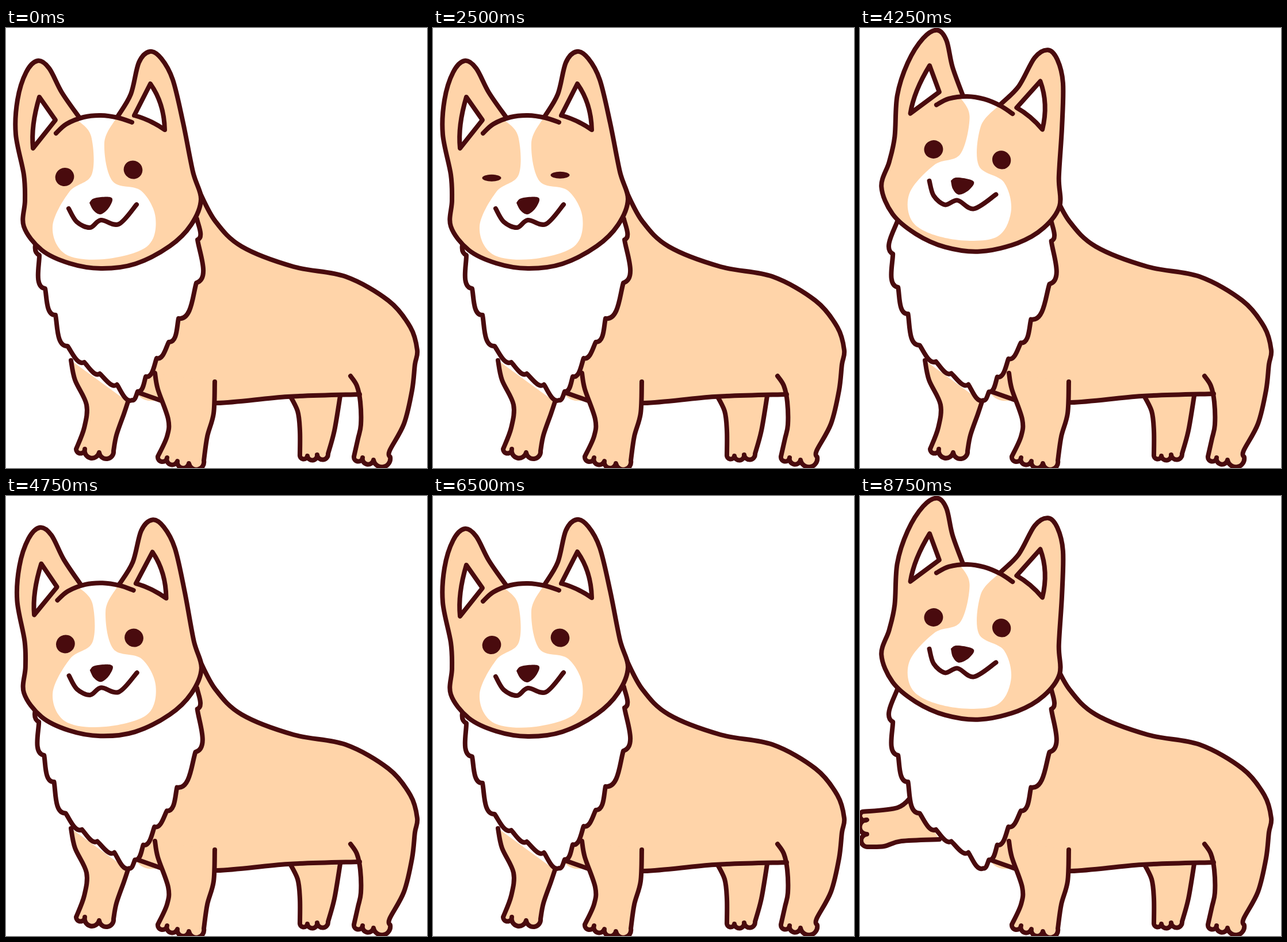
Recreate the animation shown at these times as an HTML page. Size 732 by 765 pixels, loop 9000 ms.

```html
<!DOCTYPE html>
<html lang="en">
<head>
<meta charset="utf-8">
<title>Dog</title>
<style>
  html, body { margin: 0; width: 100%; height: 100%; overflow: hidden; background: #fff; }
  svg { display: block; width: 100vw; height: 100vh; }
  path { stroke: #490b0e; stroke-width: 8; stroke-linecap: round; stroke-linejoin: round; fill: none; }
  .fur { fill: #ffd4a9; }
  .white { fill: #fff; }
  .plain { stroke: none; }
  .dark { fill: #490b0e; stroke: none; }
</style>
</head>
<body>
<svg id="stage" viewBox="0 0 732 765"></svg>
<script>
const STEP = 250, STEPS = 36;
const stage = document.getElementById('stage');

function add(parent, tag, attrs = {}) {
  const node = document.createElementNS('http://www.w3.org/2000/svg', tag);
  for (const key in attrs) node.setAttribute(key, attrs[key]);
  return parent.appendChild(node);
}

const toPoint = text => text.split(',').map(Number);

function smooth(pts) {
  let d = '';
  for (let i = 0; i < pts.length - 1; i++) {
    const p1 = pts[i], p2 = pts[i + 1], p0 = pts[i - 1] || p1, p3 = pts[i + 2] || p2;
    const a = p1.map((v, k) => v + (p2[k] - p0[k]) / 6);
    const b = p2.map((v, k) => v - (p3[k] - p1[k]) / 6);
    d += `C${a} ${b} ${p2}`;
  }
  return d;
}

// Smooth line through points; "|" makes a corner, "(" before a point a round toe.
function curve(text) {
  const [first, ...tokens] = text.trim().split(/\s+/);
  let run = [toPoint(first)], d = 'M' + first;
  for (const token of tokens) {
    const last = run[run.length - 1];
    if (token === '|') {
      d += smooth(run);
      run = [last];
    } else if (token[0] === '(') {
      const p = toPoint(token.slice(1));
      const r = Math.hypot(p[0] - last[0], p[1] - last[1]) / 2;
      d += smooth(run) + `A${r} ${r} 0 0 0 ${p}`;
      run = [p];
    } else run.push(toPoint(token));
  }
  return d + smooth(run);
}

// Tufts of fur between tips; each one is fullest at its lower end.
function tufts(text) {
  const tips = text.split(' ').map(toPoint);
  let d = 'M' + tips[0];
  for (let i = 1; i < tips.length; i++) {
    const [ax, ay] = tips[i - 1], [bx, by] = tips[i];
    const dx = bx - ax, dy = by - ay;
    const at = (along, out) => [ax + dx * along - dy * out, ay + dy * along + dx * out];
    const [c1, c2] = dy > 0 ? [at(.3, .05), at(.9, .32)] : [at(.1, .32), at(.7, .05)];
    d += `C${c1} ${c2} ${bx},${by}`;
  }
  return d;
}

const draw = (parent, look, points) => add(parent, 'path', { class: look, d: curve(points) });

// Far legs
const standingLeg = draw(stage, 'fur',
  '113,578 120,612 140,655 136,695 122,732 (137,732 (162,738 (187,735 192,708 205,671 212,650');
const raisedLeg = draw(stage, 'fur',
  '90,522 65,542 4,549 (12,563 (12,588 (14,610 42,609 72,600 138,597');
draw(stage, 'fur', '492,636 507,666 511,700 511,742 (524,744 (541,742 (560,740 571,700 581,640');

// Torso and near legs
const back = `599,605 610,622 616,650 617,690 612,714 605,745 (620,747 (639,751 (668,746 667,735 692,688
  706,630 711,585 715,560 703,520 665,474 590,432 500,415 410,380 364,336 336,284`;
const belly = '225,632 270,648 | 367,652 490,641 615,637';
draw(stage, 'fur plain', `${back} | 180,500 | ${belly}`);
const bellyLine = draw(stage, '', belly);
draw(stage, '', back);
draw(stage, 'fur', `259,600 264,628 282,680 280,710 264,745 (280,747 (298,753 (318,757 (344,752
  350,710 361,670 363,615`);

const chest = add(stage, 'path', {
  class: 'white',
  d: tufts('66,335 58,395 68,453 86,499 107,553 136,581 163,601 193,620 219,647 ' +
    '229,632 243,606 262,574 283,546 300,505 331,443 333,368 332,332')
});

// Head
const head = add(stage, 'g');
draw(head, 'fur', `127,155 97,112 75,70 55,57 35,77 20,125 17,185 31,255 33,300 31,345 62,386 110,409
  165,418 225,410 285,379 322,342 339,298 325,250 308,165 290,90 270,53 250,41 231,60 217,115 194,154`);
draw(head, 'white plain', `124,160 148,188 149,255 110,285 81,345 103,393 170,402 245,380 260,330
  235,283 185,266 171,200 190,159 | 157,153`);
draw(head, '', '87,183 105,167 135,155 165,152 195,156 219,164');
add(head, 'path', { class: 'white', d: 'M58 120L86 160L47 209Q43 170 58 120Z' });
add(head, 'path', { class: 'white', d: 'M251 97Q275 131 276 177Q250 159 223 152Z' });
draw(head, 'dark', '145,304 151,297 165,294 181,294 185,300 177,315 164,324 152,317 145,304');
draw(head, '', '109,314 123,337 146,347 165,334 196,341 227,307');

const eyes = [
  { x: 102, y: 259, drop: 3, tilt: -30 },
  { x: 221, y: 246.5, drop: 15, tilt: 30 }
];
for (const eye of eyes) eye.node = add(head, 'ellipse', { class: 'dark', cx: eye.x, rx: 16.5 });

// Two blinks in a row: half shut, shut, half open, open
const openness = i => i >= 4 && i <= 12 ? [1, .67, .38, .67][i % 4] : 1;

function pose(i) {
  const odd = i % 2 === 1;
  const pawUp = i > 30;
  const tilted = pawUp || (i >= 15 && i < 24 && Math.floor(i / 3) % 2 === 1);

  standingLeg.style.display = pawUp ? 'none' : '';
  raisedLeg.style.display = pawUp ? '' : 'none';
  bellyLine.setAttribute('transform', `translate(0 ${odd && !pawUp ? -1 : 0})`);
  chest.setAttribute('transform', `rotate(${odd ? 0.95 : 0} 200 345)`);
  head.setAttribute('transform', tilted
    ? `translate(${odd ? 95.7 : 94} -65.5) rotate(14.85)`
    : odd ? 'translate(5 -3) rotate(.8)' : '');

  const open = openness(i);
  for (const { x, y, drop, tilt, node } of eyes) {
    const cy = y + drop * (1 - open);
    node.setAttribute('cy', cy);
    node.setAttribute('ry', 15.8 * open);
    node.setAttribute('transform', `rotate(${tilt * Math.max(0, open - .4) / .6} ${x} ${cy})`);
  }
}

const start = performance.now();
function tick() {
  pose(Math.floor((performance.now() - start) / STEP) % STEPS);
  requestAnimationFrame(tick);
}
tick();
</script>
</body>
</html>
```
